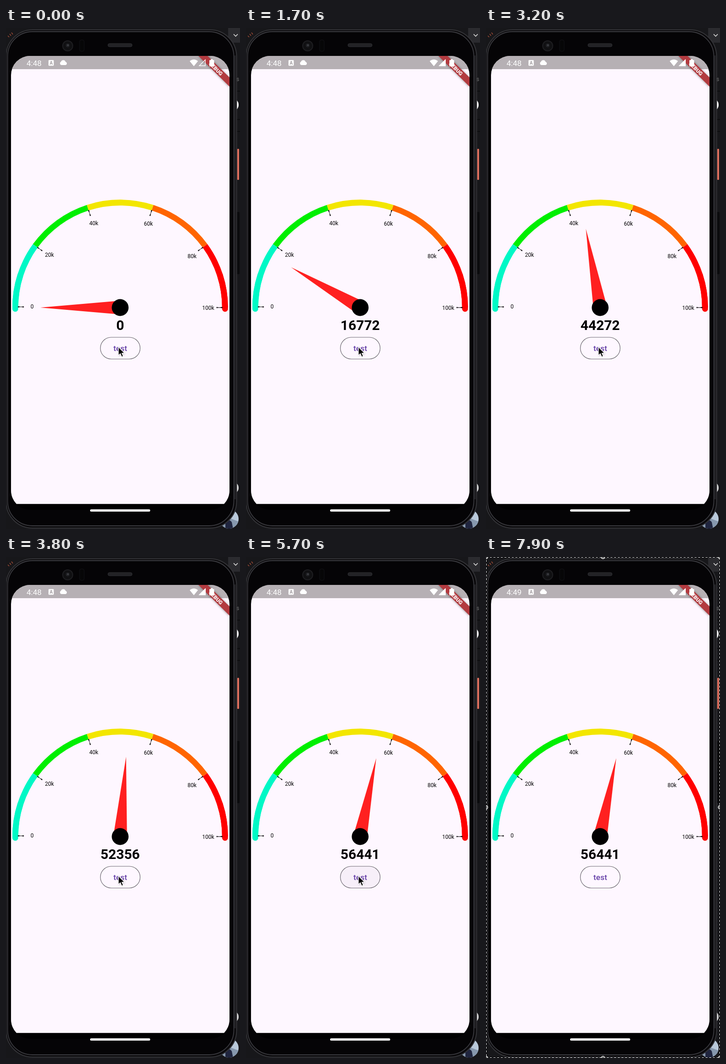
These frames come from a looping animation (512 by 1095 pixels, 8000 ms). An HTML page:

```html
<!DOCTYPE html>
<html lang="en">
<head>
<meta charset="utf-8">
<title>Gauge</title>
<style>
  html, body { margin: 0; width: 100%; height: 100%; overflow: hidden; background: #1b1b1e; }
  svg { display: block; width: 512px; height: 1095px; font-family: Roboto, sans-serif; }
</style>
</head>
<body>
<svg viewBox="0 0 512 1095">
  <defs>
    <clipPath id="screen">
      <path d="M11 103a42 42 0 0 1 42-42H447a42 42 0 0 1 42 42V1011a42 42 0 0 1-42 42H53a42 42 0 0 1-42-42Z"/>
    </clipPath>
    <clipPath id="avatar"><circle cx="488" cy="1073" r="21"/></clipPath>
    <filter id="soft" x="-30%" y="-30%" width="160%" height="160%"><feGaussianBlur stdDeviation="2.500"/></filter>
  </defs>

  <!-- desktop behind the phone -->
  <rect width="512" height="1095" fill="#17171a"/>
  <path d="M486 0H512V32H494Q486 32 486 22Z" fill="#2b2b2f"/>
  <path d="M498 13.500l4.500 4.500 4.500-4.500" fill="none" stroke="#ddd" stroke-width="1.600"/>
  <path d="M4 17l3 3M8 13l3 4M12 10l3 4" stroke="#9a4a35" stroke-width="1.500"/>
  <path d="M503 138H512M503 200H512M503 226H512" stroke="#0c0c0e" stroke-width="2"/>
  <text x="504" y="116" font-size="12" fill="#777">s</text>
  <circle cx="495" cy="168" r="14" fill="#fff"/>
  <circle cx="496" cy="1005" r="13" fill="#ddd"/>
  <g clip-path="url(#avatar)">
    <rect x="466" y="1050" width="46" height="45" fill="#b9c9da"/>
    <path d="M466 1078l20-8 26 10v15H466Z" fill="#8698ad"/>
    <path d="M480 1095v-15q7-9 14 0l3 15Z" fill="#20253f"/>
  </g>

  <!-- phone body -->
  <rect x="504" y="402" width="7" height="136" rx="2" fill="#0a0a0c"/>
  <rect x="506" y="264" width="4" height="68" rx="1.500" fill="#e0705e"/>
  <rect x="0" y="4" width="504.500" height="1089" rx="58" fill="#0a090b" stroke="#343438" stroke-width="2"/>
  <rect x="3.500" y="8" width="495" height="1080" rx="54" fill="#050406" stroke="#3b3b40" stroke-width="1.800"/>
  <rect x="499.500" y="60" width="3" height="970" fill="#242428"/>
  <circle cx="135" cy="39" r="11" fill="#101012" stroke="#1e1e21" stroke-width="2"/>
  <circle cx="135" cy="38" r="4" fill="#222327"/>
  <circle cx="135.500" cy="37.500" r="1.500" fill="#4b4c52"/>
  <rect x="161" y="26" width="10" height="25" rx="4" fill="#060607" stroke="#131316"/>
  <rect x="223" y="34" width="53" height="7" rx="3.500" fill="#222225" stroke="#303034"/>

  <!-- app screen -->
  <g clip-path="url(#screen)">
    <rect x="11" y="61" width="478" height="979.500" fill="#fef7ff"/>
    <rect x="11" y="61" width="478" height="29" fill="#b6b0b4"/>
    <path d="M421 61H441L489 109V129Z" fill="#000" opacity=".4" filter="url(#soft)"/>
    <path d="M421 61H441L489 108V128Z" fill="#b33b40"/>
    <text transform="translate(459 89) rotate(45)" y="4" text-anchor="middle" font-size="11.500" font-weight="900" fill="#fff">DEBUG</text>
    <rect x="11" y="1040.500" width="478" height="20" fill="#000"/>
  </g>
  <g fill="#fff">
    <text id="clock" x="45" y="83" font-size="17"></text>
    <rect x="93" y="70" width="11.500" height="12.500" rx="1.500"/>
    <text x="98.800" y="80" text-anchor="middle" font-size="10" font-weight="700" style="fill:#a49ea2">A</text>
    <path d="M121 81a4 4 0 0 1-.5-7.500a5.200 5.200 0 0 1 9.800 .5a3.600 3.600 0 0 1 0 7Z"/>
    <path d="M402 72.500q9-7.500 18 0L411 83.500Z"/>
    <path d="M423 82.500H436V69.500Z" stroke="#fff" stroke-width="1.400" fill="none"/>
    <path id="signal" d="M422 83.300H437V68.500Z"/>
    <path d="M445 71q0-1 1-1h2v-2h4.500v2h2q1 0 1 1v12q0 1-1 1H446q-1 0-1-1Z"/>
    <rect x="184" y="1052" width="131.500" height="5" rx="2.500"/>
  </g>

  <!-- gauge -->
  <g id="bands" fill="none" stroke-width="12.800"></g>
  <g id="ticks"></g>
  <g id="labels" font-size="12" text-anchor="middle"></g>
  <path id="needle" d="M75 611L249.800 596V626Z" fill="#ff2020"/>
  <circle cx="249.800" cy="611" r="18.400"/>
  <text id="count" x="249.800" y="660.300" text-anchor="middle" font-size="30" font-weight="700"></text>

  <rect id="button" x="206.500" y="676" width="87" height="47.500" rx="23.750" stroke="#6f6b73" stroke-width="1.200"/>
  <text x="250" y="706" text-anchor="middle" font-size="17.400" font-weight="500" fill="#6640a8">test</text>
  <g id="cursor">
    <path d="M247 699V716L260 712Z" opacity=".3" filter="url(#soft)"/>
    <path d="M246 697V715.500L250.200 711.800L253.300 718.800L256.500 717.400L253.500 710.600H259.200Z" stroke="#fff" stroke-width="1.200"/>
  </g>

  <!-- capture selection -->
  <g id="selection" fill="none">
    <rect x=".5" y=".5" width="511" height="1094" stroke="#000"/>
    <rect x=".5" y=".5" width="511" height="1094" stroke="#fff" stroke-dasharray="4 4"/>
    <g id="handles" fill="#777" stroke="#fff" stroke-width="1.200"></g>
  </g>
</svg>
<script>
const $ = id => document.getElementById(id);
const CX = 249.8, CY = 611, R = 229.5;
const polar = (deg, r) => {
  const a = deg * Math.PI / 180;
  return `${(CX - r * Math.cos(a)).toFixed(2)} ${(CY - r * Math.sin(a)).toFixed(2)}`;
};

const colors = ['#00f8c6', '#00ef00', '#f3e600', '#ff6500', '#ff0000'];
const arc = (from, to, color, cap) =>
  `<path d="M${polar(from, R)}A${R} ${R} 0 0 1 ${polar(to, R)}" stroke="${color}" stroke-linecap="${cap}"/>`;
$('bands').innerHTML =
  arc(-0.7, 18, colors[0], 'round') + arc(162, 180.7, colors[4], 'round') +
  colors.map((c, i) => arc(i * 36, i * 36 + 36, c, 'butt')).join('');

const labels = [['0', 57, 609], ['20k', 95, 495.5], ['40k', 192, 426.5],
                ['60k', 311.5, 427.5], ['80k', 407, 498.5], ['100k', 442.5, 612]];
$('labels').innerHTML = labels.map(([s, x, y]) => `<text x="${x}" y="${y + 4.2}">${s}</text>`).join('');
// Ticks pinch to a point in the middle.
$('ticks').innerHTML = labels.map((_, i) => {
  const a = i * 36 + (i ? 0 : 0.4), w = 0.3;
  return `<path d="M${polar(a - w, 223.5)}L${polar(a + w, 223.5)}L${polar(a - w, 211)}L${polar(a + w, 211)}Z"
    stroke="#000" stroke-width=".4"/>`;
}).join('');

$('handles').innerHTML = [[256, 0], [0, 547], [512, 547], [256, 1095], [0, 0], [512, 0], [0, 1095], [512, 1095]]
  .map(([x, y]) => `<circle cx="${x}" cy="${y}" r="4"/>`).join('');

// Each tap counts up in steps of 500 until its goal: [start ms, from, goal]
const runs = [[700, 0, 5772], [1075, 5772, 52356], [4450, 52356, 56441]];
function valueAt(t) {
  const run = runs.filter(r => t >= r[0]).pop();
  if (!run) return 0;
  const [start, from, goal] = run;
  return Math.min(goal, from + 500 * Math.floor((t - start) / 27.5));
}

const show = (id, on) => $(id).setAttribute('visibility', on ? 'visible' : 'hidden');

function draw(now) {
  const t = Math.floor(now % 8000 / 100) * 100;
  const value = valueAt(t);
  $('count').textContent = value;
  $('needle').setAttribute('transform', `rotate(${value * 0.0018} ${CX} ${CY})`);
  $('button').setAttribute('fill', t >= 4300 && t < 6200 ? '#f7eff9' : '#fef7ff');
  $('clock').textContent = t < 6800 ? '4:48' : '4:49';
  show('signal', t >= 100);
  show('cursor', t < 6200);
  show('selection', t >= 6400);
  requestAnimationFrame(draw);
}
draw(performance.now());
</script>
</body>
</html>
```
